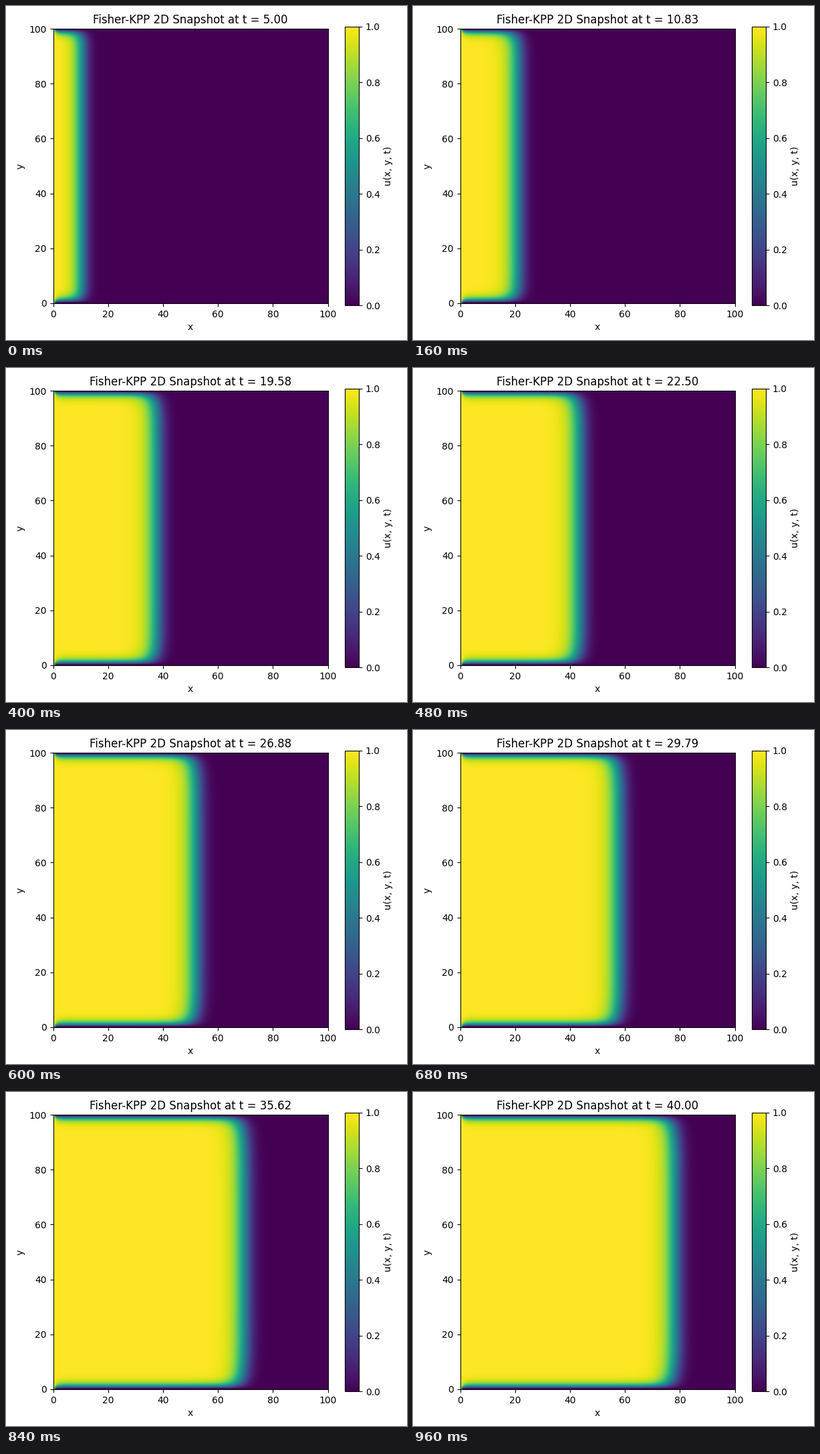
Write a matplotlib script that moves like this. It is 600 by 500 pixels and loops after 1000 ms.

```python
import numpy as np
import matplotlib.pyplot as plt
from matplotlib.animation import FuncAnimation

WIDTH, HEIGHT, DPI = 600, 500, 100
FRAMES, INTERVAL = 25, 40
SIZE, DX, DT = 100, 0.5, 0.0125
RATE = 1.027  # common factor of diffusion and growth, sets the front speed
TIMES = np.linspace(5, 40, FRAMES)
MID_TIME, MID_FRONT = 22.5, 43.2  # where the u = 0.5 level is halfway through

x = np.arange(0, SIZE + DX, DX)


def step(u):
    """Advance u_t = RATE * (laplacian(u) + u(1 - u)) by one explicit step."""
    lap = -2 * u.ndim * u
    for axis in range(u.ndim):
        lap += np.roll(u, 1, axis) + np.roll(u, -1, axis)
    u = u + DT * RATE * (lap / DX**2 + u * (1 - u))
    if u.ndim == 2:
        u[:, [0, -1]] = 0
    u[-1] = 0
    u[0] = 1
    return u


def initial_strip(width):
    return np.clip((width - x) / DX + 0.5, 0, 1)


def strip_width(guess=4.0):
    """Initial width that puts the front at MID_FRONT at MID_TIME."""
    u = initial_strip(guess)
    for _ in range(round(MID_TIME / DT)):
        u = step(u)
    front = np.interp(0.5, u[::-1], x[::-1])
    return guess + MID_FRONT - front


def solve():
    u = np.repeat(initial_strip(strip_width())[:, None], len(x), axis=1)
    snapshots, done = [], 0
    for t in TIMES:
        target = round(t / DT)
        for _ in range(target - done):
            u = step(u)
        done = target
        snapshots.append(u.T)
    return snapshots


def caption(t):
    return f"Fisher-KPP 2D Snapshot at t = {t:.2f}"


snapshots = solve()

fig, ax = plt.subplots(figsize=(WIDTH / DPI, HEIGHT / DPI), dpi=DPI)
image = ax.imshow(snapshots[0], origin="lower", extent=[0, SIZE, 0, SIZE],
                  cmap="viridis", vmin=0, vmax=1, interpolation="bilinear")
fig.colorbar(image, ax=ax, label="u(x, y, t)")
ax.set_xlabel("x")
ax.set_ylabel("y")
title = ax.set_title(caption(TIMES[0]))
fig.tight_layout()


def update(i):
    image.set_data(snapshots[i])
    title.set_text(caption(TIMES[i]))
    return image, title


anim = FuncAnimation(fig, update, frames=FRAMES, interval=INTERVAL,
                     repeat=True, repeat_delay=0)
plt.show()
```
